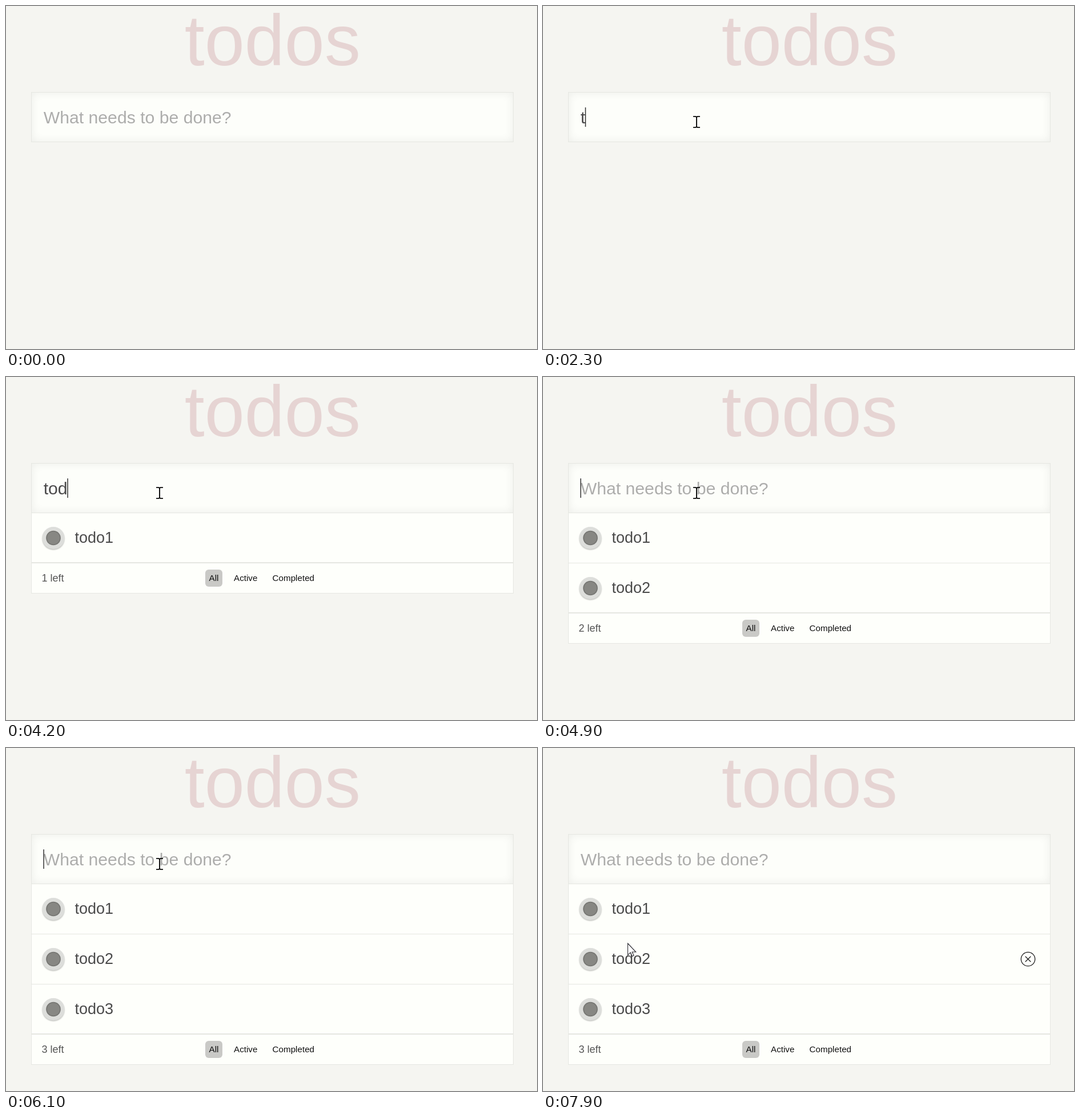
An HTML page for the animation above (8000 ms loop, 930x602 px).

```html
<!DOCTYPE html>
<html lang="en">
<head>
<meta charset="utf-8">
<title>todos</title>
<style>
  html, body { margin: 0; width: 100%; height: 100%; overflow: hidden; background: #f5f5f1; }
  #stage { position: absolute; left: 0; top: 0; width: 930px; height: 602px; overflow: hidden; }
  .card { position: absolute; left: 44px; width: 845px; box-sizing: border-box;
          border: 1px solid #e6e7e2; background: #fefffb; }
  #field { top: 151px; height: 88px; background: #fdfefa; box-shadow: inset 0 0 16px rgba(0, 0, 0, .07); }
  #list { top: 238px; }
  svg { position: absolute; left: 0; top: 0; font-family: "Liberation Sans", Arial, sans-serif; }
  .heading { font-size: 126px; fill: #e6d4d3; text-anchor: middle; }
  .entry { font-size: 30.2px; fill: #4b4a4b; }
  #hint { fill: #adadac; }
  .item { font-size: 27px; fill: #4a4a4a; }
  .count { font-size: 18px; fill: #555; }
  .filter { font-size: 15.2px; fill: #111; }
  .rule { fill: #e5e6e1; }
  .remove { fill: none; stroke: #1c1c1c; stroke-width: 1.3; }
  #beam { fill: none; stroke: #0a0a0a; stroke-width: 1.9; }
  #arrow { fill: #fff; fill-opacity: .85; stroke: #2a2a30; stroke-width: 1.1; }
</style>
</head>
<body>
<div id="stage">
  <div class="card" id="list"></div>
  <div class="card" id="field"></div>
  <svg width="930" height="602" viewBox="0 0 930 602">
    <defs>
      <radialGradient id="knob">
        <stop offset=".8" stop-color="#878783"/>
        <stop offset="1" stop-color="#6c6c69"/>
      </radialGradient>
      <filter id="soft" x="-30%" y="-30%" width="160%" height="160%">
        <feGaussianBlur stdDeviation="1.3"/>
      </filter>
    </defs>
    <text class="heading" x="466.8" y="104">todos</text>
    <text class="entry" id="hint" x="65.7" y="205.5">What needs to be done?</text>
    <text class="entry" id="typed" x="65.7" y="205.5"></text>
    <rect id="caret" y="178" width="1.5" height="34" fill="#333"/>
    <g id="rows"></g>
    <g id="footer">
      <rect class="rule" x="45" y="-2" width="843" height="2"/>
      <text class="count" id="left" x="62.5" y="32"></text>
      <rect x="349" y="11" width="30" height="30" rx="6" fill="#c9c9c6"/>
      <text class="filter" x="355.5" y="31">All</text>
      <text class="filter" x="399" y="31">Active</text>
      <text class="filter" x="466.6" y="31">Completed</text>
    </g>
    <g id="remove" class="remove">
      <circle cx="849.5" r="12.2"/>
      <path d="M844.7-4.8l9.6 9.6m0-9.6l-9.6 9.6"/>
    </g>
    <g id="pointer">
      <path id="beam" d="M-6-9.6h4.3l1.7 1 1.7-1h4.3M0-9V9M-6 9.6h4.3l1.7-1 1.7 1h4.3"/>
      <path id="arrow" d="M0 0V20.3L4.6 16L7.6 22.6L10.6 21.3L7.7 15H14.2Z"/>
    </g>
  </svg>
</div>
<script>
  const LOOP = 8000, STEP = 100, BLINK = 530, ROW = 88, TOP = 239;
  const $ = id => document.getElementById(id);
  const show = (id, on) => { $(id).style.display = on ? '' : 'none'; };

  // Key press times per word; the last one is Enter.
  const presses = [
    [2300, 2500, 2700, 2900, 3100, 3280],
    [3850, 4000, 4150, 4300, 4600, 4880],
    [5170, 5300, 5450, 5560, 5700, 5820]
  ];
  const events = [{ at: 1470, text: '', count: 0 }];
  presses.forEach((times, w) => times.forEach((at, k) => {
    const enter = k === times.length - 1;
    events.push({ at, text: enter ? '' : ('todo' + (w + 1)).slice(0, k + 1), count: enter ? w + 1 : w });
  }));

  // Pointer path: time, x, y
  const path = [
    [600, 298, 17], [800, 294, 80], [1000, 280, 150], [1200, 270, 198], [1300, 269, 203.5],
    [7300, 269, 203.5], [7400, 266, 213], [7500, 252, 230], [7600, 226, 264],
    [7700, 188, 305], [7800, 160, 333], [7900, 148.5, 343]
  ];

  $('rows').innerHTML = presses.map((_, i) => `
    <g transform="translate(0 ${TOP + ROW * i})">
      <rect class="rule" x="45" y="87" width="843" height="1"/>
      <circle cx="83" cy="45" r="19.3" fill="#000" opacity=".28" filter="url(#soft)"/>
      <circle cx="83" cy="43.5" r="19.5" fill="#dddedb"/>
      <circle cx="83" cy="43.5" r="12.8" fill="url(#knob)"/>
      <text class="item" x="120.4" y="52">todo${i + 1}</text>
    </g>`).join('');

  function pointerAt(t) {
    const i = path.findIndex(p => p[0] > t);
    if (i < 0) return path[path.length - 1].slice(1);
    const [t0, x0, y0] = path[i - 1], [t1, x1, y1] = path[i];
    const k = (t - t0) / (t1 - t0);
    return [x0 + (x1 - x0) * k, y0 + (y1 - y0) * k];
  }

  function drawPointer(t, count) {
    const visible = t >= path[0][0];
    show('pointer', visible);
    let row = -1;
    if (visible) {
      const [x, y] = pointerAt(t);
      const inField = y > 151 && y < TOP;
      $('pointer').setAttribute('transform', `translate(${x} ${y})`);
      show('beam', inField);
      show('arrow', !inField);
      row = Math.floor((y - TOP) / ROW);
    }
    const hovered = row >= 0 && row < count;
    show('remove', hovered);
    if (hovered) $('remove').setAttribute('transform', `translate(0 ${TOP + ROW * row + 131.5 - ROW})`);
  }

  function draw(t) {
    const last = events.filter(e => e.at <= t).pop();
    const { text, count } = last || { text: '', count: 0 };

    show('hint', !text);
    $('typed').textContent = text;
    show('caret', last && (t - last.at) % (2 * BLINK) < BLINK);
    $('caret').setAttribute('x', 65.3 + (text ? $('typed').getComputedTextLength() : 0));

    [...$('rows').children].forEach((row, i) => { row.style.display = i < count ? '' : 'none'; });
    show('list', count);
    show('footer', count);
    $('list').style.height = ROW * count + 54 + 'px';
    $('footer').setAttribute('transform', `translate(0 ${TOP + ROW * count})`);
    $('left').textContent = count + ' left';

    drawPointer(t, count);
  }

  const start = performance.now();
  function tick() {
    const t = (performance.now() - start) % LOOP;
    draw(Math.floor(t / STEP) * STEP);
    requestAnimationFrame(tick);
  }
  tick();
</script>
</body>
</html>
```
